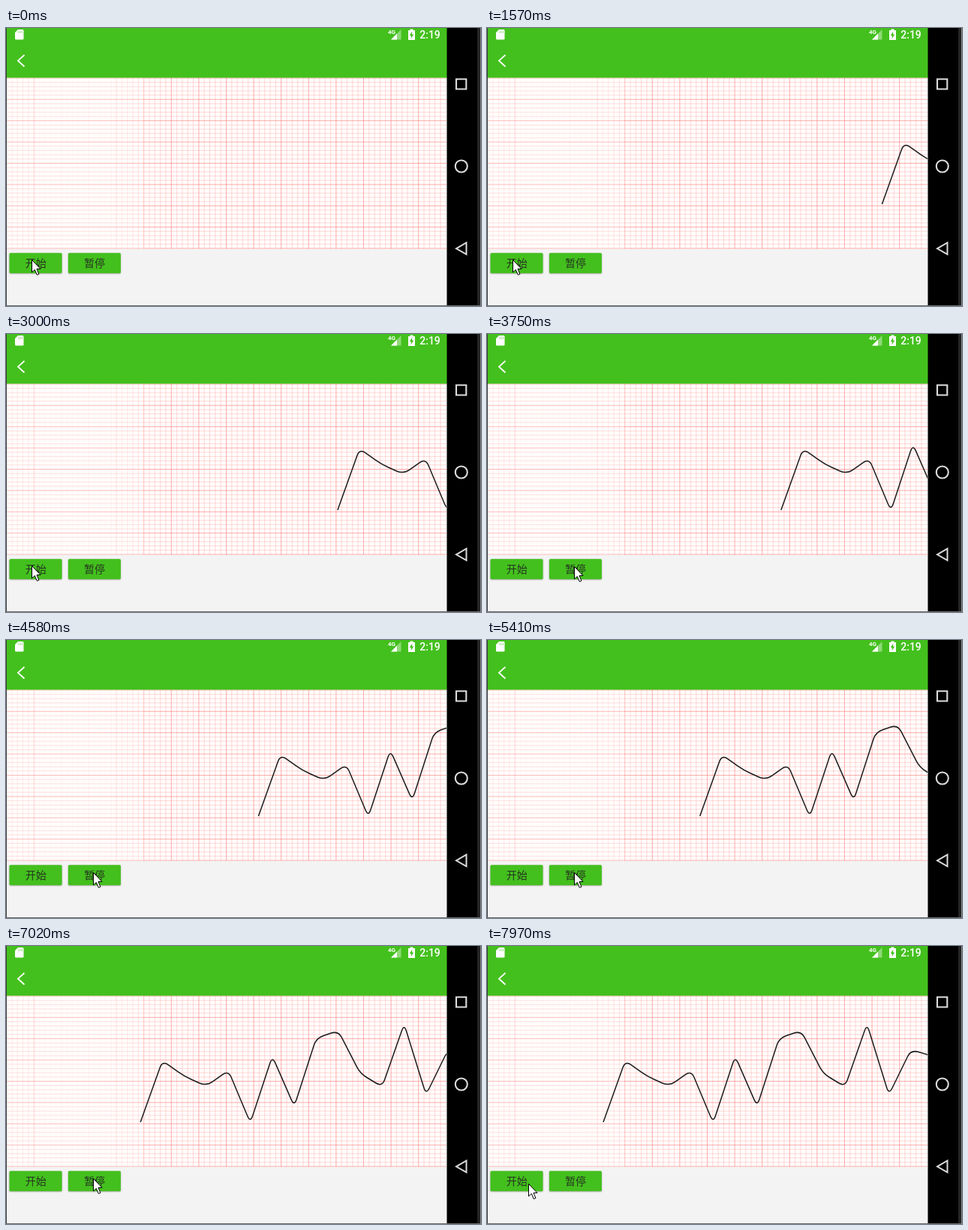
These frames come from a looping animation (633x371 px, 8 s). An HTML page with a canvas:

```html
<!DOCTYPE html>
<html lang="zh">
<head>
<meta charset="utf-8">
<title>Line chart</title>
<style>
  html, body { margin: 0; width: 100%; height: 100%; overflow: hidden; background: #f3f3f3; }
  canvas { display: block; width: 633px; height: 371px; }
</style>
</head>
<body>
<canvas id="stage" width="633" height="371"></canvas>
<script>
const ctx = document.getElementById('stage').getContext('2d');
const LOOP = 8000;
const GREEN = '#43c01d';
const WHITE = '#fff';
const CELL = { w: 7.32, h: 5.68 };
const CHART = { top: 66.4, bottom: 294.6, right: 587 };
const GAP = CELL.w * 4;
const CORNER = 10;

// Chart values, one every GAP pixels
const values = [235, 153, 174, 187, 166, 236, 147, 214, 123, 113, 170, 188, 104, 198.5, 138.5, 147];

// Key points: time and value
const lineLeft = [[530, 588], [3000, 442], [4580, 336.5], [6430, 219], [7380, 155]];
const pointerX = [[3180, 34], [3640, 116], [7730, 116], [7970, 55]];
const pointerY = [[3180, 309], [3640, 310], [7730, 310], [7970, 317]];

function track(keys, t) {
  const next = keys.findIndex(key => t <= key[0]);
  if (next === 0) return keys[0][1];
  if (next < 0) return keys[keys.length - 1][1];
  const [t0, v0] = keys[next - 1], [t1, v1] = keys[next];
  return v0 + (v1 - v0) * (t - t0) / (t1 - t0);
}

const clamp = v => Math.max(0, Math.min(1, v));

function rect(color, x, y, w, h) {
  ctx.fillStyle = color;
  ctx.fillRect(x, y, w, h);
}

function trace(points, closed) {
  ctx.beginPath();
  points.forEach(p => ctx.lineTo(...p));
  if (closed) ctx.closePath();
}

function fillShape(color, points) {
  trace(points, true);
  ctx.fillStyle = color;
  ctx.fill();
}

function stroke(color, width) {
  ctx.strokeStyle = color;
  ctx.lineWidth = width;
  ctx.stroke();
}

function text(str, x, y, font, color) {
  ctx.font = font;
  ctx.fillStyle = color;
  ctx.textAlign = 'center';
  ctx.fillText(str, x, y);
}

function drawGrid() {
  const { top, bottom, right } = CHART;
  const ink = (i, fade) => `rgba(255,120,120,${(i % 5 ? .27 : .6) * fade})`;
  rect('#fffdfc', 0, top, right + 1, bottom - top);
  for (let i = 0; i <= 40; i++) {
    const y = top + i * CELL.h;
    rect(ink(i, .8), 0, y, 183, 1);
    rect(ink(i, 1), 183, y, right - 183, 1);
  }
  // Columns fade out towards the left
  for (let i = 1; i < 80; i++) {
    const x = .2 + i * CELL.w;
    const fade = x < 40 ? .5 : .12 + .88 * clamp((x - 125) / 80);
    rect(ink(i, fade), x, top, 1, bottom - top);
  }
}

function drawHeader() {
  rect(GREEN, 0, 0, 588, CHART.top);

  // Memory card
  fillShape(WHITE, [[16, 2], [22.5, 2], [23.5, 3], [23.5, 14.5], [22.5, 15.5], [13, 15.5], [12, 14.5], [12, 6]]);
  for (let i = 0; i < 3; i++) rect('#9ddf88', 16.5 + i * 2.2, 4, 1, 3);

  // Signal
  fillShape('rgba(255,255,255,.4)', [[513, 15.5], [526.5, 15.5], [526.5, 2]]);
  fillShape(WHITE, [[513, 15.5], [521, 15.5], [521, 7.5]]);
  text('4G', 514, 8, 'bold 8px Roboto, sans-serif', WHITE);

  // Battery
  rect(WHITE, 538.5, 1.5, 4, 2);
  rect(WHITE, 536, 3, 9, 13);
  fillShape(GREEN, [[541.3, 4.5], [537.7, 10.3], [540, 10.3], [539.7, 14.3], [543.3, 8.6], [541, 8.6]]);

  text('2:19', 565, 14, '500 14px Roboto, sans-serif', WHITE);

  trace([[24.5, 36], [16, 43.7], [24.5, 51.5]]);
  stroke(WHITE, 1.8);
}

function drawNav() {
  const gray = '#dcdcdc';
  rect('#000', 587.5, 0, 41, 371);
  rect('#242424', 628, 0, 5, 371);
  ctx.beginPath();
  ctx.rect(600, 68.2, 13.3, 13.3);
  stroke(gray, 2.1);
  ctx.beginPath();
  ctx.arc(606.8, 184.5, 8, 0, Math.PI * 2);
  stroke(gray, 2.1);
  trace([[600, 294.3], [613.5, 286.5], [613.5, 302]], true);
  stroke(gray, 2);
}

function drawButton(x, label, press) {
  ctx.save();
  ctx.shadowColor = 'rgba(0,0,0,.33)';
  ctx.shadowBlur = 2 + press * 4;
  ctx.shadowOffsetY = .8 + press * 1.5;
  ctx.fillStyle = GREEN;
  ctx.beginPath();
  ctx.roundRect(x, 300.3, 70, 27, 1.5);
  ctx.fill();
  ctx.restore();
  rect(`rgba(0,0,0,${.12 * press})`, x, 300.3, 70, 27);
  text(label, x + 35.2, 319, '14px "Noto Sans CJK SC", "Noto Sans CJK", sans-serif', '#263322');
}

// Point at CORNER pixels from one vertex on the way to another
function toward([x, y], [u, v]) {
  const k = CORNER / Math.hypot(u - x, v - y);
  return [x + (u - x) * k, y + (v - y) * k];
}

function drawLine(left) {
  const pts = values.map((y, i) => [left + i * GAP, y]);
  const last = pts.length - 1;
  ctx.save();
  ctx.beginPath();
  ctx.rect(0, CHART.top, CHART.right, CHART.bottom - CHART.top);
  ctx.clip();
  ctx.beginPath();
  ctx.moveTo(...pts[0]);
  for (let i = 1; i < last; i++) {
    ctx.lineTo(...toward(pts[i], pts[i - 1]));
    ctx.quadraticCurveTo(...pts[i], ...toward(pts[i], pts[i + 1]));
  }
  ctx.lineTo(...pts[last]);
  stroke('#1c1c1c', 1.5);
  ctx.restore();
}

function drawPointer(x, y) {
  ctx.save();
  ctx.translate(Math.round(x) + .5, Math.round(y) + .5);
  trace([[0, 0], [0, 16.5], [3.8, 13], [6.8, 20], [9.4, 19], [6.5, 12], [11.5, 12]], true);
  ctx.fillStyle = WHITE;
  ctx.fill();
  stroke('#000', 1);
  ctx.restore();
}

// Full at once, then fading out
const press = (t, start, end) => t < start ? 0 : clamp((end - t) / (end - start) * 1.5);

function render(t) {
  rect('#f3f3f3', 0, 0, 633, 371);
  drawGrid();
  drawHeader();
  drawLine(track(lineLeft, t));
  drawButton(4.5, '开始', press(t, 530, 790));
  drawButton(82.9, '暂停', press(t, 7380, 7620));
  drawNav();
  rect('#3a3a3a', 0, 0, 1, 371);
  rect('#6a6a6a', 0, 370, 633, 1);
  rect('#8a8a8a', 632, 0, 1, 371);
  drawPointer(track(pointerX, t), track(pointerY, t));
}

function loop() {
  render(performance.now() % LOOP);
  requestAnimationFrame(loop);
}
loop();
</script>
</body>
</html>
```
